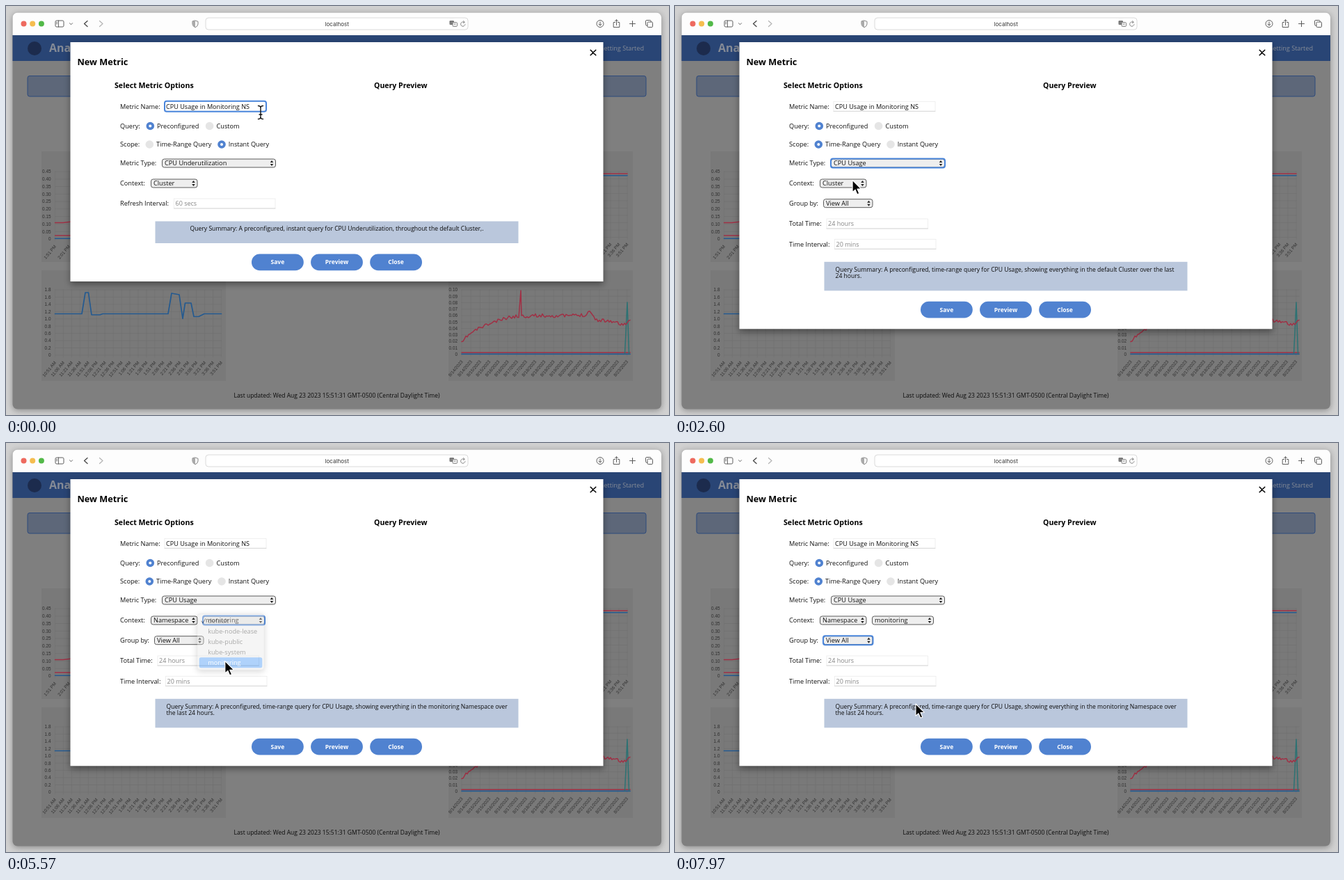
An HTML page that plays this animation: 953x588 px, repeating every 8000 ms.

```html
<!DOCTYPE html>
<html lang="en">
<head>
<meta charset="utf-8">
<title>New Metric</title>
<style>
html, body { margin: 0; width: 100%; height: 100%; overflow: hidden; background: #d1d1d1; }
svg { display: block; width: 100vw; height: 100vh; }
text { font-family: "Open Sans", "Noto Sans", sans-serif; white-space: pre; }
.b { font-weight: 700; }
.ui { font-family: Inter, "Liberation Sans", sans-serif; }
.axis { font-family: "Liberation Sans", Arial, sans-serif; font-size: 6.4px; fill: #303030; }
.win { filter: drop-shadow(0 2px 5px rgba(0,0,0,.35)); }
.modal { filter: drop-shadow(0 4px 5px rgba(0,0,0,.4)); }
.menu { filter: drop-shadow(0 2px 5px rgba(0,0,0,.4)); }
</style>
</head>
<body>
<svg id="stage" viewBox="0 0 953 588"></svg>
<script>
const NS = 'http://www.w3.org/2000/svg';
const LOOP = 8000;
const stage = document.getElementById('stage');

function el(parent, tag, attrs = {}, text) {
  const e = document.createElementNS(NS, tag);
  for (const k in attrs) e.setAttribute(k, attrs[k]);
  if (text !== undefined) e.textContent = text;
  return parent.appendChild(e);
}
const group = (p, a) => el(p, 'g', a);
const rect = (p, x, y, width, height, fill, more) =>
  el(p, 'rect', { x, y, width, height, fill, ...more });
const circle = (p, cx, cy, r, fill, more) => el(p, 'circle', { cx, cy, r, fill, ...more });
const path = (p, d, stroke, w = 1, more) =>
  el(p, 'path', { d, stroke, 'stroke-width': w, fill: 'none', 'stroke-linejoin': 'round', 'stroke-linecap': 'round', ...more });
const poly = (p, pts, stroke, w) => path(p, 'M' + pts.map(q => q.join(' ')).join('L'), stroke, w);
// y is the visual middle of the line
const label = (p, x, y, s, size = 9.2, fill = '#111', more) =>
  el(p, 'text', { x, y: y + size * .36, 'font-size': size, fill, ...more }, s);

function lerp(pts, x) {
  let i = 1;
  while (i < pts.length - 1 && x > pts[i][0]) i++;
  const a = pts[i - 1], b = pts[i];
  const u = Math.min(1, Math.max(0, (x - a[0]) / (b[0] - a[0])));
  return { a, b, u };
}

// ---------- browser window ----------
const win = group(stage);
rect(win, 9.5, 9.5, 932.5, 570, '#7f7f7f', { rx: 7, class: 'win' });
path(win, 'M9.5 42V16.5a7 7 0 0 1 7-7H935a7 7 0 0 1 7 7V42Z', 'none', 0, { fill: '#fdfdfd' });
['#ee6a5f', '#f5bd4f', '#52b948'].forEach((c, i) => circle(win, 25.5 + i * 12.7, 25.5, 4, c));

const INK = '#5c5c5c';
rect(win, 71, 21, 12, 9, 'none', { rx: 1.8, stroke: INK });
path(win, 'M75.5 21V30M72.6 23.5h1.3M72.6 25.5h1.3', INK, .9);
path(win, 'M91.5 24.7l2 2 2-2', INK, 1);
path(win, 'M117 21.5l-4.5 4 4.5 4', '#444', 1.3);
path(win, 'M134.500 21.5l4.500 4-4.500 4', '#b5b5b5', 1.3);
path(win, 'M272 21l4 1.300v3.700q0 3-4 4.800q-4-1.800-4-4.800v-3.700Z', '#777', .9);
path(win, 'M272 21v9.800q-4-1.800-4-4.800v-3.700Z', 'none', 0, { fill: '#aaa' });
rect(win, 287, 17, 377, 17, '#fff', { rx: 4, stroke: '#dadada' });
label(win, 475.7, 25.7, 'localhost', 8, '#333', { class: 'ui', 'text-anchor': 'middle' });
rect(win, 637.5, 21, 6.500, 6, '#777', { rx: 1.3 });
rect(win, 642, 23.500, 6.500, 6, '#fff', { rx: 1.3, stroke: '#777', 'stroke-width': .9 });
path(win, 'M639.300 25.500l1.500-3 1.500 3M643.700 25.500h3M645.200 25v1q-.3 1.500-1.500 2M645 26.500l1.700 1.500', '#999', .6);
path(win, 'M659.300 24a3.200 3.200 0 1 0 .7 2.500M657.500 21.500l1.700 1.600-2 1.500', '#777', .9);
circle(win, 854, 25.5, 5, 'none', { stroke: INK });
path(win, 'M854 22.800v5M852 26l2 2 2-2', INK, 1);
path(win, 'M875.500 23.500h-2.300v7h8.600v-7h-2.300M877.500 27.500v-7.500M875.500 21.700l2-2 2 2', INK, 1);
path(win, 'M896.500 25.500h8M900.500 21.500v8', INK, 1.1);
rect(win, 919.500, 20.500, 7.500, 7.500, 'none', { rx: 1.3, stroke: INK });
rect(win, 922, 23, 7.500, 7.500, '#fdfdfd', { rx: 1.3, stroke: INK });

// ---------- dimmed page ----------
rect(win, 9.5, 42, 932.5, 37, '#294575');
circle(win, 41, 61, 10, '#1c2b4d');
label(win, 62, 60.5, 'Ana', 16, '#858b96', { class: 'b' });
label(win, 917, 61, 'Getting Started', 9.1, '#858b96', { 'text-anchor': 'end' });
rect(win, 31, 100.5, 889, 29.5, '#5d6779', { rx: 3, stroke: '#2d4a7c' });
label(win, 475.5, 560, 'Last updated: Wed Aug 23 2023 15:51:31 GMT-0500 (Central Daylight Time)', 8.53, '#0c0c0c', { 'text-anchor': 'middle' });

const BLUE = '#245a90', RED = '#a03045', TEAL = '#2c7273';

function yAxis(p, x0, x1, top, bottom, max, n, digits) {
  for (let i = 0; i <= n; i++) {
    const y = top + (bottom - top) * i / n, v = max * (1 - i / n);
    path(p, `M${x0} ${y}H${x1}`, '#707070', .6);
    el(p, 'text', { x: x0 - 6, y: y + 2.3, class: 'axis', 'text-anchor': 'end' }, i === n ? '0' : v.toFixed(digits));
  }
}
function xAxis(p, xs, top, bottom, names) {
  xs.forEach((x, i) => {
    path(p, `M${x} ${top}V${bottom + 3}`, '#717171', .6);
    el(p, 'text', { class: 'axis', 'text-anchor': 'end', transform: `translate(${x + 2} ${bottom + 11}) rotate(-50)` }, names[i]);
  });
}
function clock(min) {
  const h = Math.floor(min / 60), m = String(min % 60).padStart(2, '0');
  return `${h > 12 ? h - 12 : h}:${m} ${h >= 12 ? 'PM' : 'AM'}`;
}
const range = (n, f) => Array.from({ length: n }, (_, i) => f(i));

for (const x of [51, 636]) for (const y of [209, 380]) rect(win, x, y, 265, 159, '#797979');

yAxis(win, 70.5, 310, 238, 335, .45, 9, 2);
xAxis(win, [70.5, 90.5], 238, 335, ['1:51 PM', '2:01 PM']);
poly(win, [[70.5, 311.5], [82, 311.5], [95, 310]], RED, 1.4);
poly(win, [[70.5, 330], [95, 330]], RED, 1.4);
poly(win, [[70.5, 334.3], [95, 334.3]], BLUE, 1.6);

range(10, i => path(win, `M655 ${238 + i * 10.5}H893`, '#707070', .6));
xAxis(win, [869, 881, 893], 238, 332, range(3, i => clock(921 + i * 15)));
poly(win, [[850, 241], [893, 241]], RED, 1.6);
poly(win, [[850, 243.8], [893, 243.8]], BLUE, 1.6);

yAxis(win, 70.5, 309.5, 408, 502, 1.8, 9, 1);
xAxis(win, range(21, i => 70.5 + i * 11.95), 408, 502, range(21, i => clock(651 + i * 15)));
poly(win, [[70.5, 442.5], [109, 442.5], [114, 412], [118.5, 412], [123, 444], [135, 444], [139, 442.5],
  [233, 442.5], [238, 413], [249, 415], [254, 449.5], [257.500, 427], [266, 427], [270, 446.500],
  [277, 446.500], [285, 442.5], [309.5, 442.5]], BLUE, 1.7);

yAxis(win, 655, 897, 408, 500.5, .1, 10, 2);
xAxis(win, range(19, i => 655 + i * 13.2), 408, 500.5, range(19, i => `8/${14 + Math.floor(i / 2)}/2023`));
let seed = 11;
const rnd = () => (seed = seed * 16807 % 2147483647) / 2147483647;
const trend = [[655, 485], [663, 474], [680, 463], [700, 455], [725, 447], [760, 445], [800, 445.5],
  [834, 444], [839, 437], [847, 451], [870, 453], [886, 458], [897, 454]];
const red = range(122, i => {
  const x = 655 + i * 2, { a, b, u } = lerp(trend, x);
  return [x, a[1] + (b[1] - a[1]) * u + (rnd() - .5) * 5];
});
red[42] = [740, 409];
poly(win, [[655, 500.4], [897, 500.4]], BLUE, 1.6);
poly(win, [[655, 498.3], [897, 498.3]], RED, 1.6);
poly(win, [[889.500, 500], [893, 426], [895.500, 500]], TEAL, 1.5);
poly(win, red, RED, 1.5);

// ---------- form parts ----------
const ACCENT = '#5082d0';
const caret = (p, x, y) => path(p, `M${x - 2.300} ${y - 1}l2.300-3 2.300 3ZM${x - 2.300} ${y + 1}l2.300 3 2.300-3Z`, 'none', 0, { fill: '#222' });
function select(p, x, y, w, value) {
  rect(p, x + .5, y - 6, w - 1, 12, '#eeeeee', { rx: 3, stroke: '#5a5a5a' });
  label(p, x + 4, y, value);
  caret(p, x + w - 6, y);
}
function input(p, x, y, w, value, fill = '#858585', size = 9) {
  rect(p, x, y - 7, w, 14, '#fff', { stroke: '#ebebeb', 'stroke-width': .8 });
  path(p, `M${x} ${y + 7}h${w}`, '#d4d4d4', .9);
  label(p, x + 2, y, value, size, fill);
}
function radio(p, x, y, on) {
  circle(p, x, y, 5.8, on ? ACCENT : '#e5e5e5');
  if (on) circle(p, x, y, 2, '#fff');
}

// ---------- form states ----------
const SUMMARY = 'Query Summary: A preconfigured, ';
const RANGE = SUMMARY + 'time-range query for CPU ';
const SHOWING = RANGE + 'Usage, showing everything in the ';
const CLUSTER = [SHOWING + 'default Cluster over the last', '24 hours.'];
const DEFAULT = [SHOWING + 'default Namespace over the', 'last 24 hours.'];
const MONITOR = [SHOWING + 'monitoring Namespace over', 'the last 24 hours.'];
const states = [
  { from: 0, to: 720, bottom: 396, instant: true, type: 'CPU Underutilization', ctx: 'Cluster',
    sum: [SUMMARY + 'instant query for CPU Underutilization, throughout the default Cluster,.'] },
  { from: 720, to: 2300, bottom: 435.5, type: 'CPU Underutilization', ctx: 'Cluster',
    sum: [RANGE + 'Underutilization, throughout the default Cluster, over the last', '24 hours.'] },
  { from: 2300, to: 3630, bottom: 464.3, type: 'CPU Usage', ctx: 'Cluster', grouped: true, sum: CLUSTER },
  { from: 3630, to: 5480, bottom: 464.3, type: 'CPU Usage', ctx: 'Namespace', ns: 'default', grouped: true, sum: DEFAULT },
  { from: 5480, to: LOOP, bottom: 464.3, type: 'CPU Usage', ctx: 'Namespace', ns: 'monitoring', grouped: true, sum: MONITOR }
];

function buildState(s) {
  const g = s.node = group(stage);
  rect(g, 92.5, 52, 766, s.bottom - 52, '#fff', { class: 'modal' });
  radio(g, 206.3, 199, !s.instant);
  radio(g, 310, 199, s.instant);
  select(g, 224, 226, 164, s.type);
  select(g, 208, 255, 67.5, s.ctx);
  if (s.ns) select(g, 283, 255, 89, s.ns);
  if (s.instant) {
    label(g, 164, 284, 'Refresh Interval:');
    input(g, 241.5, 284, 145.5, '60 secs');
  } else {
    const y = s.grouped ? 313 : 284.2;
    label(g, 164, y, 'Total Time:');
    input(g, 218, y, 145.5, '24 hours');
    label(g, 164, y + 29.3, 'Time Interval:');
    input(g, 229.5, y + 29.3, 145.5, '20 mins');
  }
  if (s.grouped) {
    label(g, 164, 283.7, 'Group by:');
    select(g, 213, 283.7, 71.5, 'View All');
  }
  const h = s.instant ? 31.5 : 41.5, top = s.bottom - 55 - h;
  rect(g, 214.5, top, 522, h, '#bac7dc');
  s.sum.forEach((line, i) => label(g, s.instant ? 475.5 : 230.5, top + 10.8 + i * 9.8, line, 8.6, '#0c0c0c',
    { 'text-anchor': s.instant ? 'middle' : 'start' }));
  ['Save', 'Preview', 'Close'].forEach((name, i) => {
    const x = 353 + i * 85.1;
    rect(g, x, s.bottom - 39.5, 74.8, 23.7, ACCENT, { rx: 11.8 });
    label(g, x + 37.4, s.bottom - 27.6, name, 8.5, '#fff', { class: 'b', 'text-anchor': 'middle' });
  });
}
states.forEach(buildState);

// ---------- parts shared by every state ----------
const form = group(stage);
label(form, 102.5, 80, 'New Metric', 12.7, '#000', { class: 'b' });
label(form, 156, 114, 'Select Metric Options', 10.65, '#000', { class: 'b' });
label(form, 529, 114, 'Query Preview', 10.55, '#000', { class: 'b' });
path(form, 'M840.200 63.200l7.600 7.600M847.800 63.200l-7.600 7.600', '#000', 1.5);
[['Metric Name:', 144.3], ['Query:', 172.3], ['Scope:', 199], ['Metric Type:', 226], ['Context:', 254.8]]
  .forEach(([s, y]) => label(form, 164, y, s));
input(form, 228, 144.3, 146, 'CPU Usage in Monitoring NS', '#111', 9.1);
radio(form, 207.3, 172.5, true);
radio(form, 292.6, 172.5, false);
label(form, 217, 172.3, 'Preconfigured');
label(form, 302.5, 172.3, 'Custom');
label(form, 216, 199, 'Time-Range Query');
label(form, 319.7, 199, 'Instant Query');

// ---------- focus rings: x, y, w, h, from, to ----------
const rings = [
  [228, 136.800, 146, 15, 0, 720],
  [224, 219.5, 164, 13, 1750, 2900],
  [208, 248.5, 67.5, 13, 2900, 4450],
  [283, 248.5, 89, 13, 4450, 6650],
  [213, 277.2, 71.5, 13, 6650, LOOP]
].map(([x, y, w, h, from, to]) => ({
  from, to, node: rect(stage, x, y, w, h, 'none', { rx: 3, stroke: '#4a86dc', 'stroke-width': 2 })
}));

// ---------- menus ----------
const menus = [
  { x: 217, w: 170, y: 212, open: 1750, close: 2235, check: 1, items: ['CPU Usage', 'CPU Underutilization',
    'Memory Usage by Container', 'Memory Available in Nodes (%)', 'Memory Underutilization',
    'Disk Space Available on Nodes (%)', 'Ready Nodes by Cluster', 'Node Readiness Flapping',
    'Pod Restart Rates', 'Pod Counts'] },
  { x: 200.5, w: 74.500, y: 255.5, open: 2900, close: 3600, check: 0, items: ['Cluster', 'Namespace', 'Node'] },
  { x: 275, w: 96, y: 255.700, open: 4450, close: 5450, check: 0,
    items: ['default', 'kube-node-lease', 'kube-public', 'kube-system', 'monitoring'] },
  { x: 205.5, w: 78.500, y: 284.2, open: 6650, close: 7610, check: 0, items: ['View All', 'Container', 'Pod', 'Node'] }
];
const ROW = 15, FADE = 200;
for (const m of menus) {
  const g = m.node = group(stage);
  rect(g, m.x, m.y - 10, m.w, m.items.length * ROW + 5.500, '#e7e7e6', { rx: 4, class: 'menu', stroke: '#c4c4c4', 'stroke-width': .5 });
  m.bar = rect(g, m.x + 2.7, 0, m.w - 5.4, ROW, '#378ff5', { rx: 2.5 });
  m.rows = m.items.map((s, i) => label(g, m.x + 15.2, m.y + i * ROW, s, 9.16, '#262626'));
  m.tick = path(g, `M${m.x + 6} ${m.y + m.check * ROW + .5}l2 2.700 3.600-6.200`, '#222', 1.2);
}

// ---------- pointer ----------
const track = [
  [0, 366, 153], [30, 366, 153], [280, 340, 168], [600, 272, 199], [720, 264, 200], [870, 264, 200],
  [1130, 278, 211], [1230, 278, 213], [1470, 278, 213], [1680, 280, 227], [1800, 280, 227],
  [2080, 274, 213], [2215, 273, 214], [2270, 272.500, 235], [2560, 256, 250], [2780, 246, 255],
  [2980, 246, 255], [3250, 244, 267], [3640, 244, 267], [4050, 300, 256], [4330, 314, 257],
  [4500, 311, 258], [4730, 309.500, 259.500], [4800, 310, 261], [5200, 318, 315], [5480, 318, 315],
  [5900, 292, 304], [6270, 276, 298.500], [6540, 264, 286], [6700, 264, 286], [7000, 256, 313],
  [7110, 256, 313], [7240, 256, 326], [7370, 256, 319], [7510, 256, 319], [7590, 258, 290],
  [7660, 258, 290], [7970, 346, 375], [8000, 350, 379]
];
const beam = path(stage, 'M-3.500-9.500q3.500 0 3.500 3V6.500q0 3 3.500 3M3.500-9.500q-3.500 0-3.500 3M0 6.500q0 3-3.500 3M-2 3h4', '#111', 1.4);
const arrow = path(stage, 'M0 0V17.300L4 13.700 6.800 20.200 9.700 19 6.900 12.600 12.300 12.300Z', '#fff', 1.1, { fill: '#000' });

function pointer(t) {
  const { a, b, u } = lerp(track, t), e = u * u * (3 - 2 * u);
  return [a[1] + (b[1] - a[1]) * e, a[2] + (b[2] - a[2]) * e];
}
const show = (node, on) => node.setAttribute('visibility', on ? 'visible' : 'hidden');

function render(t) {
  for (const s of [...states, ...rings]) show(s.node, t >= s.from && t < s.to);
  for (const m of menus) {
    const on = t >= m.open && t < m.close + FADE;
    show(m.node, on);
    if (!on) continue;
    m.node.setAttribute('opacity', Math.min(1, 1 - (t - m.close) / FADE));
    const y = pointer(Math.min(t, m.close - 20))[1];
    const hot = Math.max(0, Math.min(m.items.length - 1, Math.round((y - m.y) / ROW)));
    m.bar.setAttribute('y', m.y - 7.500 + hot * ROW);
    m.rows.forEach((r, i) => r.setAttribute('fill', i === hot ? '#fff' : '#262626'));
    m.tick.setAttribute('stroke', m.check === hot ? '#fff' : '#222');
  }
  const [x, y] = pointer(t), typing = t < 130;
  show(beam, typing);
  show(arrow, !typing);
  for (const c of [beam, arrow]) c.setAttribute('transform', `translate(${x} ${y})`);
}

const start = performance.now();
function tick() {
  render((performance.now() - start) % LOOP);
  requestAnimationFrame(tick);
}
tick();
</script>
</body>
</html>
```
